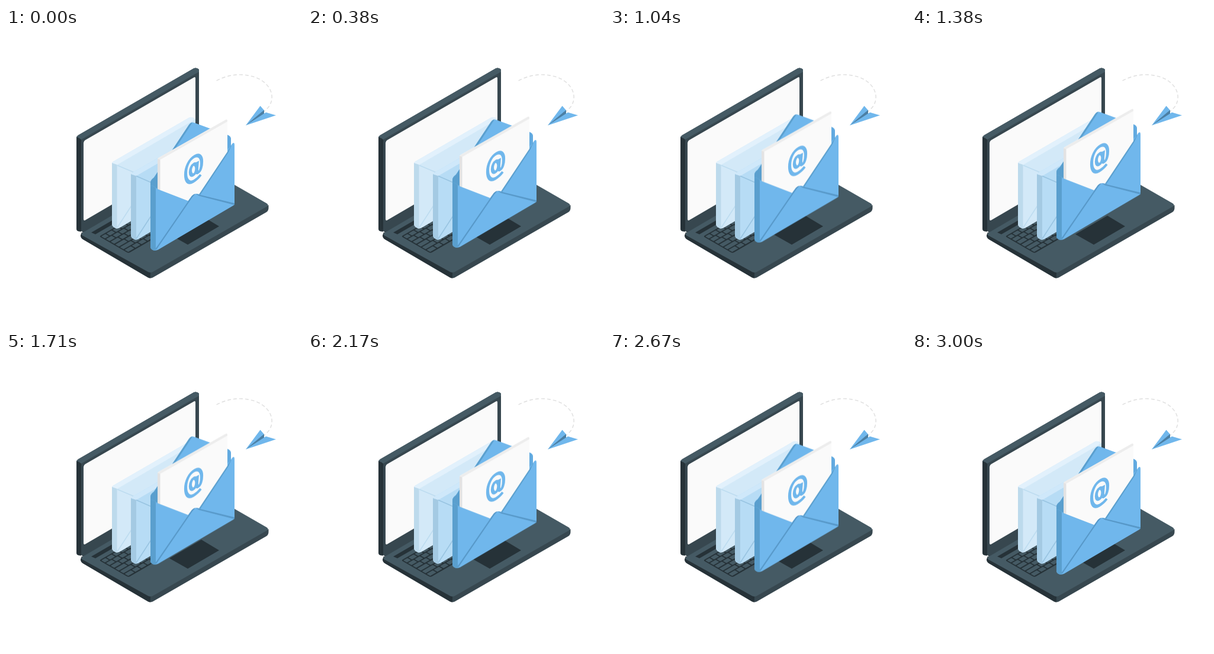
An HTML page that plays this animation: 500x500 px, repeating every 3.04 s.

```html
<!DOCTYPE html>
<html lang="en">
<head>
<meta charset="utf-8">
<title>Mail on a laptop</title>
<style>
  html, body { margin: 0; width: 100%; height: 100%; overflow: hidden; background: #fff; }
  svg { display: block; width: 100vw; height: 100vh; }
</style>
</head>
<body>
<svg viewBox="0 0 500 500" xmlns="http://www.w3.org/2000/svg">
  <!-- flight path and paper plane -->
  <path d="M355.500 89C372 80 391 77 408 80C436 84 451 103 449 120C448 129 443 135 436 141" fill="none" stroke="#dedede" stroke-width="1.400" stroke-dasharray="6 4"/>
  <path d="M405 164.500L429.500 131.500L436 139L435.500 145.500Z" fill="#70b7ec"/>
  <path d="M405 164.500L436 138.500V146.500Z" fill="#4b7fa4"/>
  <path d="M405 164.500L439 142.500L456 147.500Z" fill="#70b7ec"/>

  <!-- laptop base -->
  <path d="M127 342L326 227V250L140 358Z" fill="#37474f"/>
  <path d="M126 350Q126 354 130 357L240 421.500Q244 423.500 248 421.500L440 311Q443.500 308.500 443.500 304V299L244 406Z" fill="#37474f"/>
  <path d="M126 350Q126 355 130 357L240 421.500Q242 422.500 244 422.500V409L128 345Z" fill="#263238"/>
  <path d="M129 350.500Q126 348 130 345.500L326 230.500L440 296Q445 299 440 302L248 412Q244 414 240 412Z" fill="#455a64"/>
  <path d="M144 345.500L250 284L257 287.500L151 348.500Z" fill="#263238"/>
  <path d="M276 348.500L330 317L360 335L307 366Z" fill="#263238"/>
  <g id="keys" transform="matrix(.866 -.5 .866 .5 157.500 352)">
    <rect width="170" height="57" rx="3" fill="#263238"/>
  </g>

  <!-- laptop lid -->
  <path d="M119 185Q119 183 123 180.500L317 68.300Q322 66 326 70V228L127 343.500H123Q119 343 119 339Z" fill="#37474f"/>
  <path d="M119 185Q119 183 123 180.500L317 68.300Q322 66 326 70V74L127 188.500Z" fill="#455a64"/>
  <path d="M119 184.500Q122 184.500 127 188.500V344L122 343Q119 341.500 119 338Z" fill="#263238"/>
  <path d="M131 194Q131 191 134 189.300L317 83.700Q320 82 320 85V216L134 324.500Q131 326 131 323Z" fill="#fafafa"/>

  <!-- waiting envelopes -->
  <g>
    <path d="M179 229Q179 226.500 182 225L310 151Q315 149.500 320 154V262L192 337.500Q187 340 183 337Q179 335 179 331Z" fill="#d3e9f8"/>
    <path d="M179 228Q179 226 182 225L310 151Q315 149.500 320 154L188 231Z" fill="#e2f1fc"/>
    <path d="M179 228L187.500 231V339Q179 336 179 331Z" fill="#bddaec"/>
    <path d="M188 232L219 245L250 258M188 337L236 263" fill="none" stroke="#bddcf0" stroke-width="1.500"/>
  </g>
  <g>
    <path d="M211 248Q211 245.500 214 244L343 170Q348 168 352 173V280L224 356.500Q219 359 215 356Q211 354 211 350Z" fill="#b7dcf5"/>
    <path d="M211 247Q211 245.500 214 244L343 170Q348 168 352 173L220 250Z" fill="#cfe8fa"/>
    <path d="M211 247L220 250V358Q211 355 211 350Z" fill="#a4cae3"/>
    <path d="M220 250L252 264M220 356L268 282" fill="none" stroke="#98c4e1" stroke-width="1.500"/>
  </g>

  <!-- floating envelope -->
  <g id="mail">
    <path d="M244 268V261Q244 257 250 252.500L309 163.500Q312.500 158 318 160L375 181Q380 183 380 188V230L256 300Z" fill="#70b7ec"/>
    <path d="M244 268V261Q244 257 250 252.500L309 163.500Q312 159.500 315 159.500L256 249V276Z" fill="#5a9fce"/>
    <path d="M373 180L375 181Q380 183 380 188V200L373 205Z" fill="#62aae0"/>
    <path d="M256 222Q256 220 258 219L371 155Q374 153.500 374 157V230L315 305L256 285Z" fill="#fafafa"/>
    <path d="M256 222Q256 220 258 219L371 155Q374 153.500 374 157V158L260.500 222.500Z" fill="#ededed"/>
    <path d="M256 221L260.500 222.500V286L256 284Z" fill="#e3e3e3"/>
    <g transform="matrix(1 -.577 0 1 317 238.300)" fill="none" stroke="#70b7ec" stroke-width="5.200">
      <path d="M12 16.500C8 19.500 4 20.500 0 20.500C-9 20.500 -13.500 11.500 -13.500 0.500C-13.500 -12 -7.500 -20.500 1 -20.500C9.500 -20.500 13.500 -12.500 13.500 -3.500C13.500 5.500 11 10 8 10C5.500 10 5 7.500 5.300 4L6.400 -9"/>
      <ellipse cx="-.3" cy=".7" rx="5.300" ry="8.800"/>
    </g>
    <!-- pocket -->
    <path d="M244 267Q246 265 251 268.500L257 272.500L307.500 292L314 283.500Q320 278 327 281L376 207.500L382 195.500Q386 191.500 386 198V297Q386 299 383 300.500L257 374.500Q251 377 247 374.500Q244 373 244 369Z" fill="#70b7ec"/>
    <path d="M244 267Q246 264.500 253 270V376Q244 376 244 369Z" fill="#5a9fce"/>
    <path d="M252.500 373L314 283.500Q317 280 320 280L315 285.500L254 374.500Z" fill="#5798c8"/>
    <path d="M320 280L386 296V299L326 283.500Z" fill="#5798c8"/>
    <path d="M382 195.500L376 209.500L328 282L326 281L375 207.500Z" fill="#5a9fce"/>
  </g>
</svg>
<script>
  const keys = document.getElementById('keys');
  const rowStarts = [10, 13, 16, 19, 23, 14];

  function addKey(x, y, width) {
    const key = document.createElementNS('http://www.w3.org/2000/svg', 'rect');
    const shape = { x, y, width, height: 7, rx: 1, fill: '#455a64' };
    for (const name in shape) key.setAttribute(name, shape[name]);
    keys.append(key);
  }

  rowStarts.forEach((first, row) => {
    const y = 2 + row * 9.1;
    addKey(2, y, first - 2);
    for (let x = first + 2; x < 155; x += 12) addKey(x, y, 10);
  });

  // Straight up and down over three seconds at 24 steps a second, then a short rest.
  const loop = 3040, half = 1500;
  const step = (y, time, easing) =>
    ({ transform: `translate(0px, ${y}px)`, offset: time / loop, easing });
  document.getElementById('mail').animate([
    step(0, 0, 'steps(36, end)'),
    step(-19.5, half, 'steps(36, end)'),
    step(0, 2 * half, 'linear'),
    step(0, loop, 'linear')
  ], { duration: loop, delay: -5, iterations: Infinity });
</script>
</body>
</html>
```
